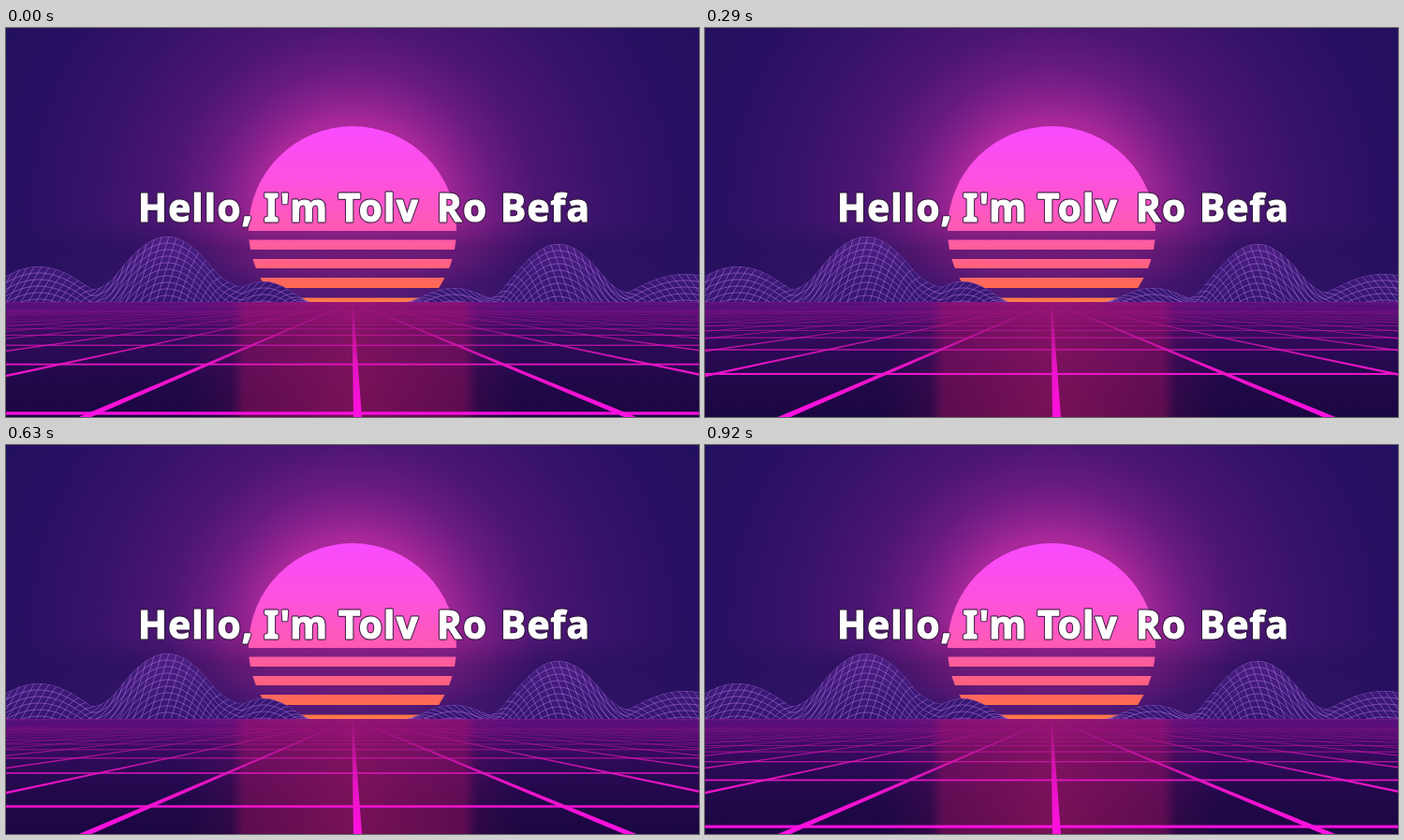
Recreate the animation shown at these times as an HTML page with a canvas. Size 740 by 416 pixels, loop 960 ms.

```html
<!DOCTYPE html>
<html lang="en">
<head>
<meta charset="utf-8">
<title>Neon horizon</title>
<style>
  html, body { margin: 0; width: 100%; height: 100%; overflow: hidden; background: #231060; }
  canvas { display: block; }
</style>
</head>
<body>
<canvas id="stage" width="740" height="416"></canvas>
<script>
const W = 740, H = 416, HORIZON = 293, VANISH = 370;
const LOOP = 960, STEPS = 23, STEP_MS = 1000 / 24;
const ctx = document.getElementById('stage').getContext('2d');

function withStops(gradient, stops) {
  for (const [at, color] of stops) gradient.addColorStop(at, color);
  return gradient;
}
const vertical = (y0, y1, stops) => withStops(ctx.createLinearGradient(0, y0, 0, y1), stops);
const radial = (x, y, r, stops) => withStops(ctx.createRadialGradient(x, y, 0, x, y, r), stops);

function rect(fill, x, y, w, h) {
  ctx.fillStyle = fill;
  ctx.fillRect(x, y, w, h);
}

function drawSky() {
  rect(radial(370, 198, 430, [
    [0, '#b82aa0'], [.23, '#a82899'], [.28, '#8c2290'], [.36, '#681b80'],
    [.46, '#4d1674'], [.62, '#39136b'], [.82, '#281063'], [1, '#231060']
  ]), 0, 0, W, HORIZON);
  rect(vertical(205, HORIZON, [
    [0, 'rgba(38,16,92,0)'], [.35, 'rgba(38,16,92,.65)'], [1, 'rgba(44,18,100,.7)']
  ]), 0, 205, W, HORIZON - 205);
  // Wide, flat glow behind the lower half of the sun.
  ctx.save();
  ctx.translate(370, 228);
  ctx.scale(1, .3);
  rect(radial(0, 0, 200, [
    [0, 'rgba(135,28,125,.5)'], [.55, 'rgba(135,28,125,.45)'], [1, 'rgba(135,28,125,0)']
  ]), -200, -200, 400, 400);
  ctx.restore();
}

function drawSun() {
  ctx.save();
  ctx.beginPath();
  ctx.rect(0, 100, W, 117);
  for (const [y, h] of [[226.5, 10.5], [247, 10], [267, 11], [288.5, 4.5]]) ctx.rect(0, y, W, h);
  ctx.clip();
  ctx.beginPath();
  ctx.arc(370, 216, 111, 0, 2 * Math.PI);
  ctx.fillStyle = vertical(105, HORIZON, [
    [0, '#f94aff'], [.3, '#fc51e0'], [.6, '#ff5ab0'], [.77, '#ff6088'], [.9, '#ff6855'], [1, '#ff7c48']
  ]);
  ctx.fill();
  ctx.restore();
}

// Each hill: centre, height, half width.
const leftHills = [[35, 38, 80], [172, 70, 82], [275, 22, 50]];
const rightHills = [[478, 15, 50], [590, 62, 75], [725, 30, 85]];

function drawRange(hills, from, to, lean) {
  const hill = (x, [c, h, w]) => h * Math.max(0, 1 - ((x - c) / w) ** 2) ** 1.5;
  const height = x => hills.reduce((sum, shape) => sum + hill(x, shape), 0);
  const ridge = drop => {
    for (let x = from; x <= to; x += 2) ctx.lineTo(x, HORIZON - height(x) + drop);
  };
  ctx.save();
  ctx.beginPath();
  ctx.moveTo(from, HORIZON);
  ridge(0);
  ctx.lineTo(to, HORIZON);
  ctx.closePath();
  ctx.fillStyle = vertical(222, HORIZON, [[0, '#4c2082'], [.6, '#3c1a78'], [1, '#34166f']]);
  ctx.fill();
  ctx.clip();
  ctx.beginPath();
  for (let drop = 0; drop < 70; drop += 7) {
    ctx.moveTo(from, HORIZON - height(from) + drop);
    ridge(drop);
  }
  for (let x0 = from - 40; x0 <= to + 40; x0 += 8) {
    for (let s = 0; s <= 1.01; s += .1) {
      const x = x0 + lean * s;
      ctx[s ? 'lineTo' : 'moveTo'](x, HORIZON - height(x) * s);
    }
  }
  ctx.lineWidth = .8;
  ctx.strokeStyle = 'rgba(180,116,222,.66)';
  ctx.stroke();
  ctx.restore();
}

function drawTitle() {
  ctx.font = '800 40.5px "Noto Sans", "Open Sans", sans-serif';
  ctx.letterSpacing = '1.2px';
  ctx.lineJoin = 'round';
  ctx.fillStyle = '#fff';
  const words = [['Hello,', 141], ["I'm", 275.5], ['Tolv', 355], ['Ro', 460], ['Befa', 528]];
  for (const [word, x] of words) {
    for (const [color, width] of [['rgba(45,28,55,.85)', 3.4], ['#fff', 1.2]]) {
      ctx.strokeStyle = color;
      ctx.lineWidth = width;
      ctx.strokeText(word, x, 207);
    }
    ctx.fillText(word, x, 207);
  }
}

const floorFill = vertical(HORIZON, H, [
  [0, '#5c1080'], [.12, '#440d6b'], [.4, '#2c0a56'], [.7, '#200848'], [1, '#1b0741']
]);
const reflection = withStops(ctx.createLinearGradient(190, 0, 550, 0), [
  [0, 'rgba(185,20,100,0)'], [.14, 'rgba(185,20,100,.12)'], [.18, 'rgba(185,20,100,.42)'],
  [.5, 'rgba(195,24,104,.55)'], [.83, 'rgba(185,20,100,.42)'], [.87, 'rgba(185,20,100,.12)'],
  [1, 'rgba(185,20,100,0)']
]);
const neon = vertical(HORIZON, H, [
  [0, 'rgba(170,20,150,.2)'], [.15, 'rgba(200,20,165,.5)'], [.3, 'rgba(215,20,175,.75)'],
  [.55, '#e814c4'], [1, '#ff10e2']
]);

function drawFloor(phase) {
  const depth = H - HORIZON;
  rect(floorFill, 0, HORIZON, W, depth);
  rect(reflection, 190, HORIZON, 360, depth);

  ctx.fillStyle = neon;
  for (let i = -24; i <= 24; i++) {
    const x = 375.5 + 291 * i, half = 4.5 + 2.2 * Math.abs(i);
    ctx.beginPath();
    ctx.moveTo(VANISH - .7, HORIZON);
    ctx.lineTo(VANISH + .7, HORIZON);
    ctx.lineTo(x + half, H);
    ctx.lineTo(x - half, H);
    ctx.fill();
  }
  // Evenly spaced lines in depth: the screen distance is the reciprocal.
  for (let i = 0; i < 16; i++) {
    const d = 1 / (.0084 + .0066 * (i - phase));
    const thick = Math.max(.4, d * .027);
    ctx.fillRect(0, HORIZON + d - thick / 2, W, thick);
  }
  rect('rgba(150,24,150,.4)', 0, HORIZON, W, 1);
}

drawSky();
drawSun();
drawRange(leftHills, 0, 324, 22);
drawRange(rightHills, 428, W, -22);
drawTitle();

function tick() {
  const t = performance.now() % LOOP;
  const step = Math.min(STEPS - 1, Math.floor((t + 4) / STEP_MS));
  drawFloor(step / STEPS);
  requestAnimationFrame(tick);
}
tick();
</script>
</body>
</html>
```
